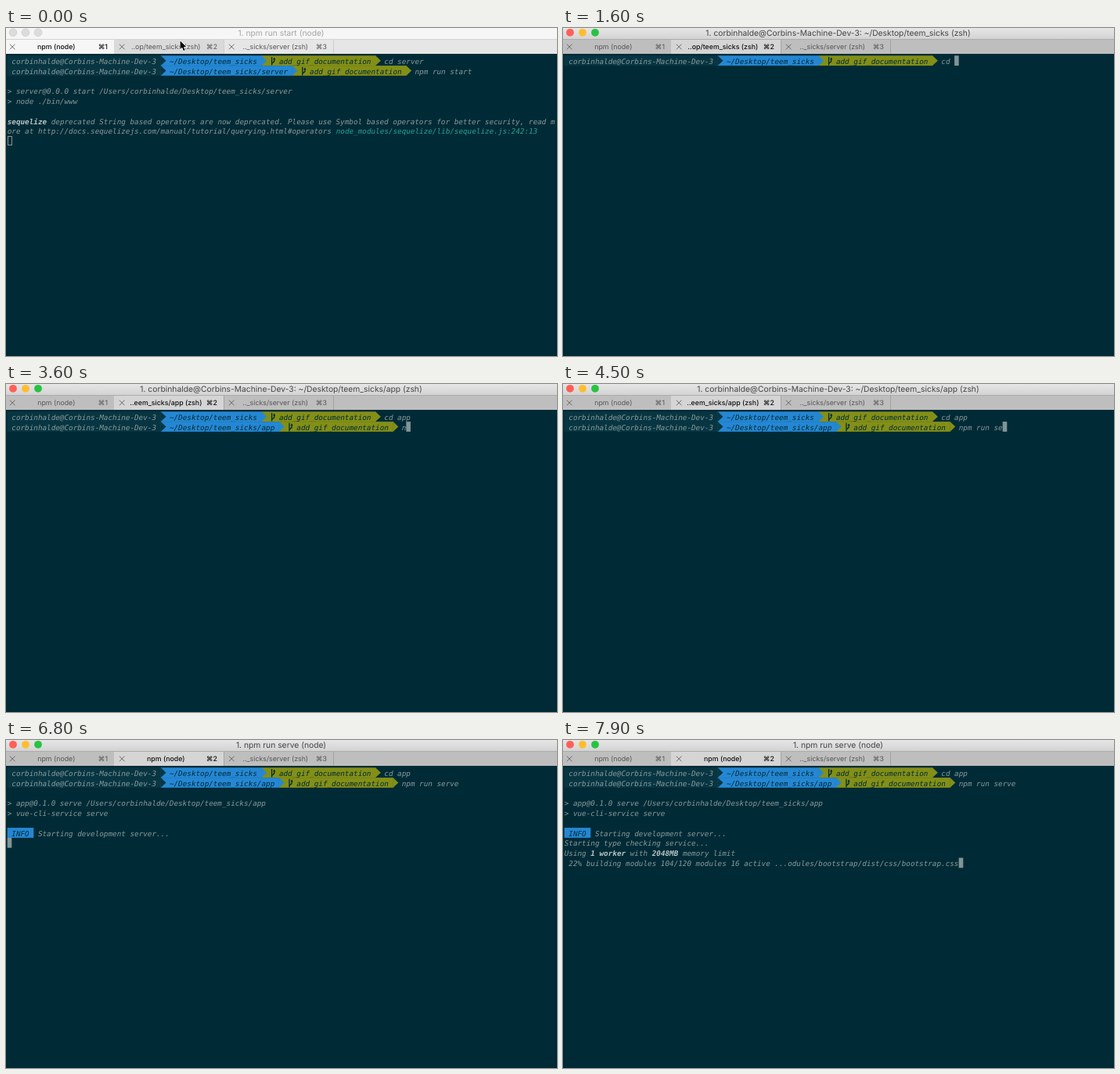
Write an HTML page with a canvas that moves like this. It is 704 px wide and 419 px high and loops after 8 s.

```html
<!DOCTYPE html>
<html lang="en">
<head>
<meta charset="utf-8">
<title>Terminal</title>
<style>
  html, body { margin: 0; width: 704px; height: 419px; overflow: hidden; background: #002b36; }
  canvas { display: block; }
</style>
</head>
<body>
<canvas id="stage" width="704" height="419"></canvas>
<script>
const ctx = document.getElementById('stage').getContext('2d');
const W = 704, H = 419, LOOP = 8000, STEP = 100;
const CELL = 5.6, ROW = 12.8, LEFT = 1.7, TOP = 35.3;
const TAB_TOP = 14, TAB_H = 19;
const USER = 'corbinhalde', HOST = 'Corbins-Machine-Dev-3';
const HOME = '~/Desktop/teem_sicks', BRANCH = 'add_gif_documentation';
const MONO = '9.302px "DejaVu Sans Mono", monospace';
const SANS = 'Inter, "DejaVu Sans", sans-serif';
const C = {
  bg: '#002b36', base: '#073642', blue: '#2587d3', olive: '#838f17',
  text: '#8a999b', bold: '#bac5c5', teal: '#2aa198', block: '#839496'
};

// Moments of the session, in ms
const T = { click: 300, hide: 1300, cd: 1300, enterCd: 2300, npm: 3500, enterNpm: 5000,
            info: 5600, check: 7100, using: 7200, build: 7400, end: 7900 };

const colX = col => LEFT + col * CELL;
const rowY = row => TOP + row * ROW;
const typed = (text, t, start) => text.slice(0, Math.max(0, Math.floor((t - start) / 100)));

function box(x, y, w, h, color) {
  ctx.fillStyle = color;
  ctx.fillRect(x, y, w, h);
}

function shape(points, color) {
  ctx.beginPath();
  points.forEach(([x, y]) => ctx.lineTo(x, y));
  ctx.closePath();
  ctx.fillStyle = color;
  ctx.fill();
}

function write(row, col, text, color = C.text, weight = '') {
  ctx.font = `italic ${weight} ${MONO}`;
  ctx.textAlign = 'left';
  ctx.fillStyle = color;
  ctx.fillText(text, colX(col), rowY(row) + 10.4);
  return col + text.length;
}

function label(text, x, y, size, color, weight = 400, align = 'center') {
  ctx.font = `${weight} ${size}px ${SANS}`;
  ctx.textAlign = align;
  ctx.fillStyle = color;
  ctx.fillText(text, x, y);
}

function block(row, col, hollow) {
  if (!hollow) return box(colX(col), rowY(row), CELL, ROW, C.block);
  ctx.strokeStyle = C.block;
  ctx.lineWidth = 1;
  ctx.strokeRect(Math.round(colX(col)) + .5, Math.round(rowY(row)) + .5, 5, 11);
}

function arrow(row, col, color) {
  const x = colX(col), y = rowY(row);
  shape([[x - .3, y], [x, y], [x + CELL + 1.2, y + ROW / 2], [x, y + ROW], [x - .3, y + ROW]], color);
}

function branchIcon(row, col) {
  const x = colX(col), y = rowY(row);
  ctx.strokeStyle = C.bg;
  ctx.lineWidth = 1.3;
  ctx.beginPath();
  ctx.moveTo(x + 1.9, y + 1.7);
  ctx.lineTo(x + 1.9, y + 12.3);
  ctx.moveTo(x + 1.9, y + 10.1);
  ctx.lineTo(x + 5, y + 7.5);
  ctx.lineTo(x + 5, y + 3.5);
  ctx.stroke();
  shape([[x + 3.3, y + 5.1], [x + 5, y + 2.3], [x + 6.7, y + 5.1]], C.bg);
}

// Draws a shell prompt and returns the column where the command begins.
function prompt(row, path) {
  const pathCol = 37, blueEnd = pathCol + path.length + 1;
  const nameCol = blueEnd + 4, oliveEnd = nameCol + BRANCH.length + 1;
  const segment = (from, to, color) =>
    box(colX(from), rowY(row), colX(to) - colX(from), ROW, color);
  segment(0, 35, C.base);
  segment(35, blueEnd, C.blue);
  segment(blueEnd, oliveEnd, C.olive);
  arrow(row, 35, C.base);
  arrow(row, blueEnd, C.blue);
  arrow(row, oliveEnd, C.olive);
  write(row, 1, `${USER}@${HOST}`);
  write(row, pathCol, path, C.bg);
  branchIcon(row, blueEnd + 2);
  write(row, nameCol, BRANCH, C.bg);
  return oliveEnd + 2;
}

function serverTab() {
  write(0, prompt(0, HOME), 'cd server');
  write(1, prompt(1, HOME + '/server'), 'npm run start');
  write(3, 0, `> server@0.0.0 start /Users/${USER}/Desktop/teem_sicks/server`);
  write(4, 0, '> node ./bin/www');
  const col = write(6, 0, 'sequelize', C.bold, 'bold');
  write(6, col, ' deprecated String based operators are now deprecated. Please use Symbol based operators for better security, read m');
  const link = write(7, 0, 'ore at http://docs.sequelizejs.com/manual/tutorial/querying.html#operators ');
  write(7, link, 'node_modules/sequelize/lib/sequelize.js:242:13', C.teal);
  block(8, 0, true);
}

function buildLine(t) {
  const p = Math.min(1, (t - T.build) / (T.end - T.build));
  const pct = Math.round(10 + 12 * p), done = Math.round(4 + 100 * p);
  return ` ${pct}% building modules ${done}/${done + 16} modules 16 active ...odules/bootstrap/dist/css/bootstrap.css`;
}

function appTab(t) {
  let row = 0, col = write(0, prompt(0, HOME), typed('cd app', t, T.cd));
  if (t >= T.enterCd) {
    row = 1;
    col = write(1, prompt(1, HOME + '/app'), typed('npm run serve', t, T.npm));
  }
  if (t >= T.enterNpm) {
    row = 2;
    col = 0;
  }
  if (t >= T.enterNpm + 300) {
    write(3, 0, `> app@0.1.0 serve /Users/${USER}/Desktop/teem_sicks/app`);
    write(4, 0, '> vue-cli-service serve');
    row = 5;
  }
  if (t >= T.info) {
    box(colX(0), rowY(6), 6 * CELL, ROW, C.blue);
    write(6, 1, 'INFO', C.bg);
    write(6, 7, 'Starting development server...');
    row = 7;
  }
  if (t >= T.check) {
    write(7, 0, 'Starting type checking service...');
    row = 8;
  }
  if (t >= T.using) {
    let c = write(8, 0, 'Using ');
    c = write(8, c, '1 worker', C.bold, 'bold');
    c = write(8, c, ' with ');
    c = write(8, c, '2048MB', C.bold, 'bold');
    write(8, c, ' memory limit');
    row = 9;
  }
  if (t >= T.build) col = write(9, 0, buildLine(t));
  block(row, col);
}

function titleFor(t) {
  if (t < T.click) return '1. npm run start (node)';
  if (t >= T.enterNpm) return '1. npm run serve (node)';
  return `1. ${USER}@${HOST}: ${HOME}${t >= T.enterCd ? '/app' : ''} (zsh)`;
}

function tabName(t) {
  if (t >= T.enterNpm) return 'npm (node)';
  return t >= T.enterCd ? '..eem_sicks/app (zsh)' : '..op/teem_sicks (zsh)';
}

function titleBar(t, focused) {
  const bar = ctx.createLinearGradient(0, 0, 0, TAB_TOP);
  bar.addColorStop(0, focused ? '#e6e6e6' : '#f6f6f6');
  bar.addColorStop(1, focused ? '#d3d3d3' : '#f6f6f6');
  box(0, 0, W, TAB_TOP, bar);
  const lights = focused ? ['#ff5f57', '#ffbd2e', '#28c33f'] : ['#dcdcdc', '#dcdcdc', '#dcdcdc'];
  lights.forEach((color, i) => {
    ctx.beginPath();
    ctx.arc(9 + 16 * i, 5.8, 4.9, 0, 7);
    ctx.fillStyle = color;
    ctx.fill();
    if (!focused) {
      ctx.strokeStyle = '#cbcbcb';
      ctx.lineWidth = .7;
      ctx.stroke();
    }
  });
  label(titleFor(t), 351.5, 9.8, 10.3, focused ? '#444' : '#a5a5a5');
}

function tabBar(t, focused) {
  const active = focused ? 1 : 0;
  box(0, TAB_TOP, W, TAB_H, focused ? '#bebebe' : '#e6e6e6');
  ['npm (node)', tabName(t), '.._sicks/server (zsh)'].forEach((name, i) => {
    const x = i * 140 - 2, on = i === active;
    if (on) box(x, TAB_TOP, 140, TAB_H, focused ? '#d5d5d5' : '#f6f6f6');
    else if (!focused && i === 1) box(x, TAB_TOP, 140, TAB_H, '#dadada');
    box(x + 140, TAB_TOP, 1, TAB_H, focused ? '#a3a3a3' : '#cfcfcf');
    ctx.strokeStyle = '#606060';
    ctx.lineWidth = .9;
    ctx.beginPath();
    for (const s of [-1, 1]) {
      ctx.moveTo(x + 10.2 - 3.3, 24 - 3.3 * s);
      ctx.lineTo(x + 10.2 + 3.3, 24 + 3.3 * s);
    }
    ctx.stroke();
    const color = on ? '#111' : '#555', weight = on ? 500 : 400;
    label(name, x + 66.3, 27.2, 8.8, color, weight);
    label('⌘' + (i + 1), x + 132, 27.2, 8.8, color, weight, 'right');
  });
  box(0, TAB_TOP, W, 1, focused ? '#acacac' : '#d4d4d4');
}

function pointer(t) {
  if (t >= T.hide) return;
  const path = [[0, 222, 16], [300, 211, 23], [600, 211, 23], [1100, 209, 179], [T.hide, 209, 179]];
  const i = path.findIndex(p => p[0] > t);
  const [t0, x0, y0] = path[i - 1], [t1, x1, y1] = path[i];
  const k = (t - t0) / (t1 - t0), ease = k * k * (3 - 2 * k);
  ctx.save();
  ctx.translate(x0 + (x1 - x0) * ease, y0 + (y1 - y0) * ease);
  ctx.lineJoin = 'round';
  ctx.lineWidth = 1.6;
  ctx.strokeStyle = '#fff';
  shape([[.6, .6], [.6, 11], [3, 8.8], [4.9, 13], [6.7, 12.2], [4.9, 8.2], [8.2, 8.1]], '#000');
  ctx.stroke();
  ctx.fill();
  ctx.restore();
}

function draw(now) {
  const t = Math.floor(now % LOOP / STEP) * STEP, focused = t >= T.click;
  ctx.textRendering = 'geometricPrecision';
  box(0, 0, W, H, C.bg);
  if (focused) appTab(t);
  else serverTab();
  titleBar(t, focused);
  tabBar(t, focused);
  pointer(t);
}

const start = performance.now();
function tick() {
  draw(performance.now() - start);
  requestAnimationFrame(tick);
}
tick();
</script>
</body>
</html>
```
